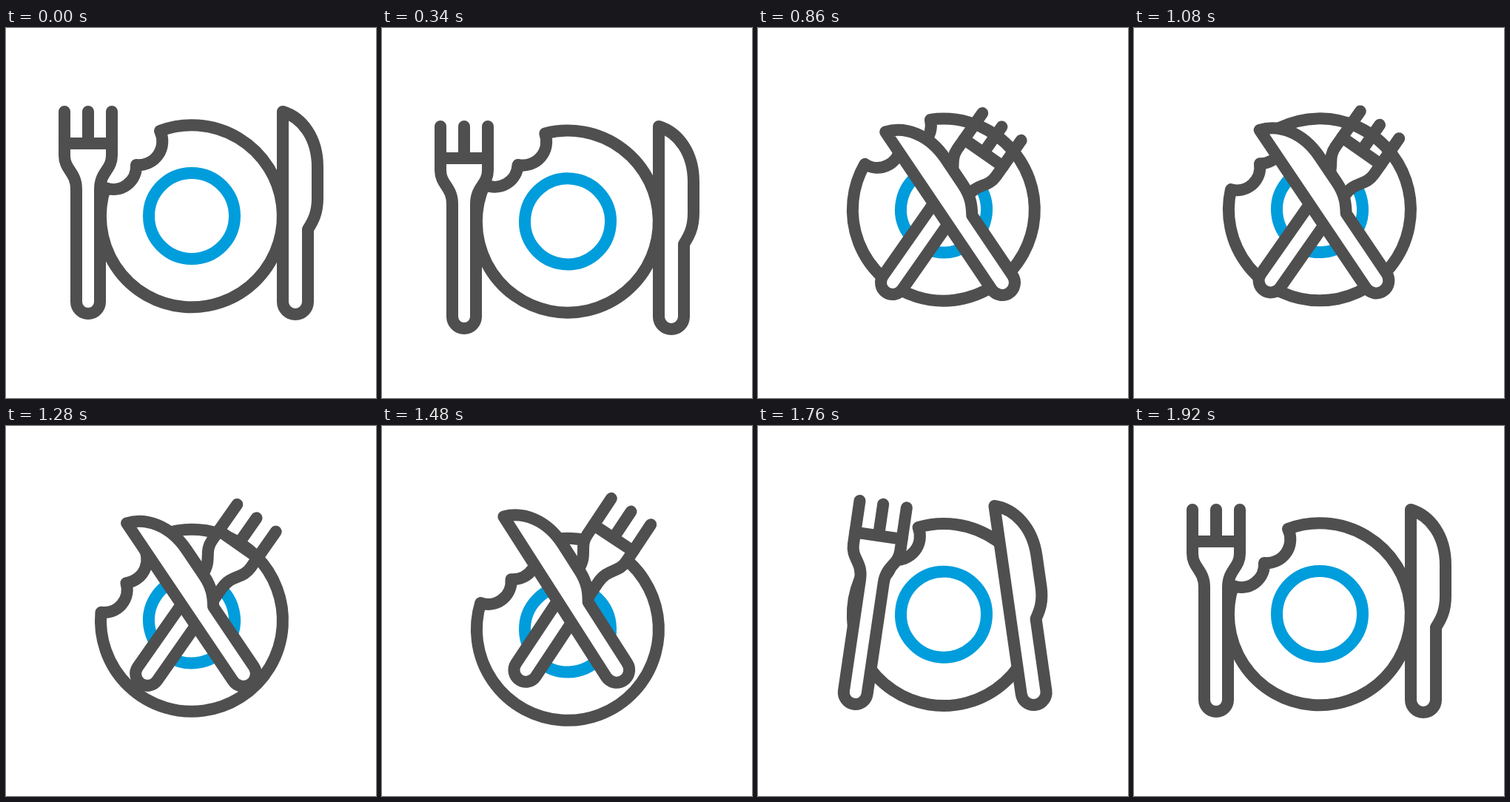
Animation of 500 by 500 pixels, one loop 2 s. Source, as an HTML page:

```html
<!DOCTYPE html>
<html lang="en">
<head>
<meta charset="utf-8">
<title>Plate, fork and knife</title>
<style>
html, body { margin: 0; width: 100%; height: 100%; overflow: hidden; background: #fff; }
svg { display: block; width: 100vw; height: 100vh; }
</style>
</head>
<body>
<svg viewBox="0 0 500 500" fill="none" stroke="#4f4f4f" stroke-width="16" stroke-linecap="round" stroke-linejoin="round">
  <g id="plate">
    <circle r="58" stroke="#009ddc"/>
    <path d="M-43-115A32 32 0 0 1-75-69A31 31 0 0 1-117-38A123 123 0 1 0-43-115Z"/>
  </g>
  <g id="fork">
    <path d="M-32-257V-214M0-257V-214M32-257V-214"/>
    <path fill="#fff" d="M-32-214V-198C-32-178-16-176-16-152V0A16 16 0 0 0 16 0V-152C16-176 32-178 32-198V-214Z"/>
  </g>
  <g id="knife">
    <path fill="#fff" d="M-17-257C9-249 30-222 30-182V-140C30-120 24-109 17-98V0A17 17 0 0 1-17 0Z"/>
  </g>
</svg>
<script>
const LOOP = 2000;

// Progress from 0 to 1 between two times, straight or eased
const ramp = (t, from, to) => Math.min(1, Math.max(0, (t - from) / (to - from)));
const ease = (t, from, to) => {
  const s = ramp(t, from, to);
  return s * s * (3 - 2 * s);
};

function place(id, x, y, angle) {
  document.getElementById(id).setAttribute("transform",
    `translate(${x} ${y}) rotate(${angle})`);
}

function drawPlate(t) {
  const bounce = 20 * ease(t, 160, 600) - 29 * ease(t, 600, 880)
    + 30 * ease(t, 1070, 1450) - 21 * ease(t, 1450, 1800);
  const turn = 25 * ease(t, 220, 600) - 38 * ease(t, 590, 1280)
    + 20 * ease(t, 1280, 1640) - 7 * ease(t, 1640, 1920);
  place("plate", 251, 254 + bounce, turn);
}

// Dip, cross over the plate, slide on slowly, then go back home
function drawCutlery(t, id, homeX, side, reach, tilt) {
  const cross = ease(t, 340, 850);
  const dip = 20 * (ease(t, 100, 340) - cross);
  const slide = 16 * ramp(t, 850, 1420) ** 2;
  const away = side * (1 - ease(t, 1420, 1920));
  const rise = (26 * cross + slide) * Math.abs(away);
  place(id, homeX + away * (reach * cross + slide), 370 + dip - rise, away * tilt * cross);
}

function draw() {
  const t = performance.now() % LOOP;
  drawPlate(t);
  drawCutlery(t, "fork", 111, 1, 71, 35);
  drawCutlery(t, "knife", 391, -1, 61, 34);
  requestAnimationFrame(draw);
}
draw();
</script>
</body>
</html>
```
